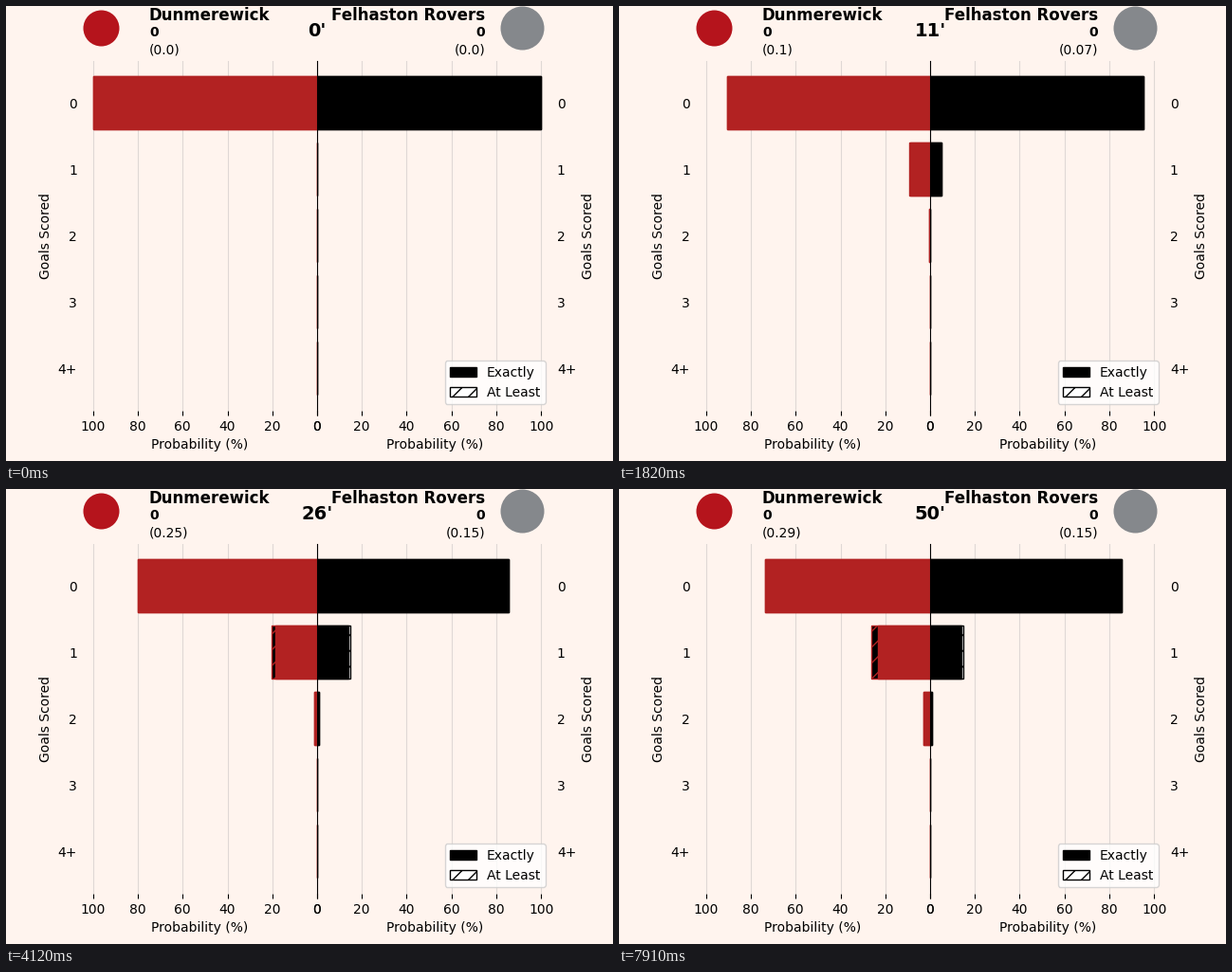
These frames come from a looping animation (640x480 px, 8 s). A matplotlib script:

```python
import numpy as np
import matplotlib.pyplot as plt
from matplotlib.animation import FuncAnimation
from matplotlib.patches import Ellipse, Patch

WIDTH, HEIGHT, DPI = 640, 480, 100
LOOP, STEP = 8000, 25
PLAIN_MS, SHOT_MS, SHOT_STEPS = 160, 30, 5
BACKGROUND = "#fff4ee"
ROWS = np.arange(5)

# minute -> chance of scoring, one shot per minute
HOME_SHOTS = {3: 0.03, 8: 0.06, 10: 0.0055, 14: 0.109, 26: 0.046, 49: 0.042}
AWAY_SHOTS = {11: 0.065, 13: 0.052, 25: 0.037}

plt.rcParams["font.family"] = "DejaVu Sans"


def goal_chances(shots, minute):
    """Percent chance of 0, 1, 2, 3 and 4+ goals after the given minute."""
    chances = np.array([1.0, 0, 0, 0, 0])
    for when, p in shots.items():
        if when <= minute:
            scored = np.roll(chances, 1) * p
            scored[0] = 0
            missed = chances * (1 - p)
            missed[4] = chances[4]
            chances = missed + scored
    return 100 * chances


def at_least(exact):
    totals = np.cumsum(exact[::-1])[::-1]
    totals[0] = exact[0]
    return totals


def build_timeline():
    """List of (start in ms, minute, progress through that minute's shot)."""
    timeline, start, minute = [], 0, 0
    while start < LOOP:
        if minute in HOME_SHOTS or minute in AWAY_SHOTS:
            for progress in np.linspace(0, 1, SHOT_STEPS):
                timeline.append((start, minute, progress))
                start += SHOT_MS
        else:
            timeline.append((start, minute, 1.0))
            start += PLAIN_MS
        minute += 1
    return timeline


fig, axes = plt.subplots(1, 2, figsize=(WIDTH / DPI, HEIGHT / DPI), dpi=DPI,
                         facecolor=BACKGROUND, gridspec_kw={"wspace": 0})


def label(x, baseline, text, size=10, weight="bold", ha="left"):
    return fig.text(x / WIDTH, 1 - baseline / HEIGHT, text, fontsize=size,
                    fontweight=weight, ha=ha, va="baseline")


def badge(x, y, radius, color):
    fig.add_artist(Ellipse((x / WIDTH, 1 - y / HEIGHT), 2 * radius / WIDTH,
                           2 * radius / HEIGHT, color=color, lw=0))


class Side:
    def __init__(self, ax, shots, name, x, ha, color, second_color):
        self.ax, self.shots = ax, shots
        self.least_bars = ax.barh(ROWS, 0, color=second_color,
                                  edgecolor=color, hatch="//")
        self.exact_bars = ax.barh(ROWS, 0, color=color, edgecolor=color)
        label(x, 15, name, size=12, ha=ha)
        label(x, 32.5, "0", ha=ha)
        self.expected = label(x, 50, "", weight="normal", ha=ha)
        self.style_axes()

    def style_axes(self):
        ax = self.ax
        ax.set_facecolor(BACKGROUND)
        ax.set_ylim(4.64, -0.64)
        ax.set_yticks(ROWS, ["0", "1", "2", "3", "4+"])
        ax.set_xticks(range(0, 101, 20))
        ax.tick_params(axis="y", length=0)
        ax.set_axisbelow(True)
        ax.grid(axis="x", alpha=0.4)
        ax.set_xlabel("Probability (%)")
        ax.set_ylabel("Goals Scored")
        ax.spines[["top", "bottom", "left", "right"]].set_visible(False)

    def show(self, minute, progress):
        before = goal_chances(self.shots, minute - 1)
        after = goal_chances(self.shots, minute)
        exact = before + (after - before) * progress
        for bars, widths in ((self.exact_bars, exact),
                             (self.least_bars, at_least(exact))):
            for bar, width in zip(bars, widths):
                bar.set_width(width)
        total = sum(p for when, p in self.shots.items() if when <= minute)
        self.expected.set_text(f"({round(float(total), 2)})")


home = Side(axes[0], HOME_SHOTS, "Dunmerewick", 151, "left",
            "firebrick", "black")
away = Side(axes[1], AWAY_SHOTS, "Felhaston Rovers", 505, "right",
            "black", "white")
home.ax.set_xlim(105, 0)
away.ax.set_xlim(0, 105)
away.ax.yaxis.tick_right()
away.ax.yaxis.set_label_position("right")
away.ax.tick_params(axis="y", length=0)
away.ax.spines["left"].set_visible(True)
away.ax.legend(handles=[
    Patch(facecolor="black", edgecolor="black", label="Exactly"),
    Patch(facecolor="white", edgecolor="black", hatch="//", label="At Least"),
], loc="lower right")

badge(100.5, 23.5, 19, "#b5141c")
badge(544.5, 23.5, 23, "#85888c")
clock = label(328, 32.5, "", size=14, ha="center")

TIMELINE = build_timeline()
STARTS = [entry[0] for entry in TIMELINE]


def update(frame):
    now = (frame + 1) * STEP - 1
    _, minute, progress = TIMELINE[np.searchsorted(STARTS, now, "right") - 1]
    home.show(minute, progress)
    away.show(minute, progress)
    clock.set_text(f"{minute}'")
    return []


animation = FuncAnimation(fig, update, frames=LOOP // STEP, interval=STEP,
                          init_func=lambda: [], repeat=True, repeat_delay=0)
plt.show()
```
